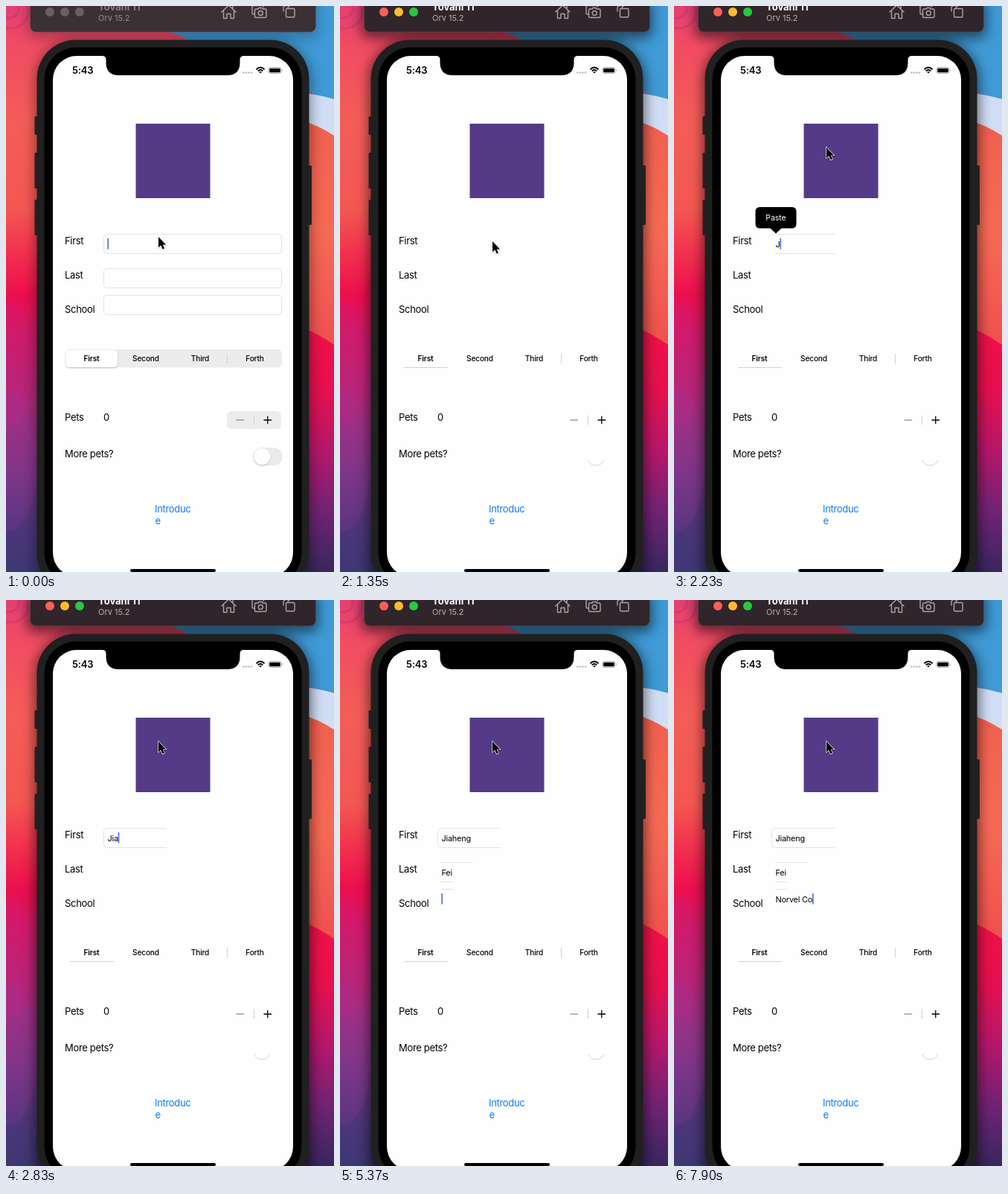
Write an HTML page that moves like this. It is 441 px wide and 760 px high and loops after 8000 ms.

```html
<!DOCTYPE html>
<html lang="en">
<head>
<meta charset="utf-8">
<title>Form demo</title>
<style>
html, body { margin: 0; width: 100%; height: 100%; overflow: hidden; background: #fff; }
svg { display: block; width: 441px; height: 760px; font-family: Inter, "Liberation Sans", sans-serif; }
text { white-space: pre; }
.label { font-size: 13px; letter-spacing: -.32px; }
.input { font-size: 10.9px; letter-spacing: -.2px; }
.seg { font-size: 10.1px; font-weight: 500; letter-spacing: -.15px; text-anchor: middle; }
.line { fill: none; stroke: #e3e3e3; }
.icon { fill: none; stroke: #ada3a5; stroke-width: 1.4; stroke-linejoin: round; stroke-linecap: round; }
</style>
</head>
<body>
<svg viewBox="0 0 441 760" xmlns="http://www.w3.org/2000/svg">
  <defs>
    <linearGradient id="left" x2="0" y2="1">
      <stop offset="0" stop-color="#e24070"/>
      <stop offset=".07" stop-color="#f04c62"/>
      <stop offset=".2" stop-color="#f35d58"/>
      <stop offset=".36" stop-color="#f35752"/>
      <stop offset=".44" stop-color="#f22f4e"/>
      <stop offset=".51" stop-color="#ec0f4e"/>
      <stop offset=".58" stop-color="#cf1c66"/>
      <stop offset=".7" stop-color="#a92c7c"/>
      <stop offset=".82" stop-color="#793683"/>
      <stop offset=".92" stop-color="#4c3679"/>
      <stop offset="1" stop-color="#3d3873"/>
    </linearGradient>
    <linearGradient id="coral" gradientUnits="userSpaceOnUse" x1="0" y1="160" x2="0" y2="445">
      <stop offset="0" stop-color="#f2604f"/>
      <stop offset=".5" stop-color="#f56a55"/>
      <stop offset="1" stop-color="#f0524f"/>
    </linearGradient>
    <linearGradient id="crimson" gradientUnits="userSpaceOnUse" x1="0" y1="435" x2="0" y2="760">
      <stop offset="0" stop-color="#f01048"/>
      <stop offset=".25" stop-color="#e5104f"/>
      <stop offset=".5" stop-color="#b5176a"/>
      <stop offset=".75" stop-color="#702374"/>
      <stop offset="1" stop-color="#38275f"/>
    </linearGradient>
    <filter id="soft" x="-30%" y="-30%" width="160%" height="160%"><feGaussianBlur stdDeviation="8"/></filter>
    <filter id="drop" x="-30%" y="-30%" width="160%" height="160%"><feDropShadow dx="0" dy="1" stdDeviation="1" flood-opacity=".25"/></filter>
  </defs>

  <g id="wallpaper">
    <rect width="441" height="760" fill="url(#left)"/>
    <g fill="none" stroke="#b8217d" stroke-opacity=".3" stroke-width="3">
      <ellipse cx="6" cy="8" rx="24" ry="22"/>
      <ellipse cx="4" cy="4" rx="13" ry="12"/>
    </g>
    <ellipse cx="6" cy="480" rx="32" ry="82" fill="#c91b7c" opacity=".25"/>
    <ellipse cx="4" cy="610" rx="38" ry="95" fill="#9c379a" opacity=".2"/>
    <path d="M205 30Q228 36 250 48L441 130V0H205Z" fill="#3f9ad6"/>
    <path d="M395 116Q420 119 441 125V176L395 156Z" fill="#d0def5"/>
    <path d="M395 153Q420 160 441 174V460H395Z" fill="url(#coral)"/>
    <path d="M395 430Q420 440 441 455V760H395Z" fill="url(#crimson)"/>
  </g>

  <g filter="url(#soft)">
    <rect id="barShadow" x="28" y="-10" width="392" height="54" rx="12"/>
    <rect id="phoneShadow" x="38" y="46" width="373" height="760" rx="54"/>
  </g>

  <g id="toolbar">
    <rect id="bar" x="32.5" y="-12" width="384" height="47" rx="8" stroke="#6a5558" stroke-opacity=".5"/>
    <g id="lights"></g>
    <text id="device" x="124" y="6" font-size="13" font-weight="700">Tovani 11</text>
    <text id="system" x="124" y="20" font-size="11">Orv 15.2</text>
    <g class="icon">
      <path d="M290 8L299.5-1L309 8M292.5 7V16.5H297V10.5H302V16.5H306.5V7M305 0V3"/>
      <path d="M334 11H332.5Q331 11 331 9.500V1Q331-.5 332.500-.5H345Q346.500-.5 346.500 1M336 4H339L340 2.500H344L345 4H348.500Q350 4 350 5.500V14Q350 15.500 348.500 15.500H336Q334.500 15.500 334.500 14V5.500Q334.500 4 336 4Z"/>
      <circle cx="342.300" cy="9.500" r="3"/>
      <path d="M378 3.500H386.500Q388 3.500 388 5V13.500Q388 15 386.500 15H378Q376.500 15 376.500 13.500V5Q376.500 3.500 378 3.500ZM373 7V3Q373-.5 376.500-.5H381M379-3L381.500-.5L379 2"/>
    </g>
  </g>

  <g id="phone">
    <g fill="#232022">
      <rect x="38.500" y="148" width="5" height="25" rx="1.500"/>
      <rect x="38.500" y="197" width="5" height="48" rx="1.500"/>
      <rect x="38.500" y="260" width="5" height="48" rx="1.500"/>
      <rect x="406" y="214" width="5" height="80" rx="1.500"/>
    </g>
    <rect x="41.500" y="45.500" width="366" height="742" rx="52" fill="#202021"/>
    <rect x="51.500" y="55.500" width="346" height="722" rx="43"/>
    <rect x="63" y="67" width="323" height="699" rx="32" fill="#fefefe"/>
    <path d="M129 66H320V67Q314.500 67 314.500 72V76Q314.500 93 297.500 93H151.500Q134.500 93 134.500 76V72Q134.500 67 129 67Z"/>
    <rect x="167" y="756" width="115" height="4" rx="2"/>
    <text x="89" y="91" font-size="13" font-weight="600" letter-spacing="-.2">5:43</text>
    <g fill="#b9b9b9">
      <circle cx="319.500" cy="89.500" r="1.200"/><circle cx="323" cy="89.500" r="1.200"/>
      <circle cx="326.500" cy="89.500" r="1.200"/><circle cx="330" cy="89.500" r="1.200"/>
    </g>
    <g fill="none" stroke="#000" stroke-width="1.900">
      <path d="M336.500 85.200Q342 80 347.500 85.200M338.700 87.400Q342 84.300 345.300 87.400"/>
    </g>
    <path d="M340.200 88.700Q342 87.200 343.800 88.700L342 90.600Z"/>
    <rect x="353" y="82.500" width="17" height="8" rx="2.300" fill="#fff" stroke="#999" stroke-width=".8"/>
    <rect x="354.200" y="83.700" width="14.600" height="5.600" rx="1.300"/>
    <path d="M371.300 85Q373 86.500 371.300 88Z" fill="#888"/>
    <rect x="174.500" y="158" width="100" height="100" fill="#553b87"/>
  </g>

  <g id="full">
    <g class="line">
      <rect x="131.500" y="306.500" width="239" height="26" rx="4"/>
      <rect x="131.500" y="352.500" width="239" height="26" rx="4"/>
      <rect x="131.500" y="388.500" width="239" height="26" rx="4"/>
    </g>
    <rect x="80" y="461" width="291" height="24.500" rx="6" fill="#ececec"/>
    <rect x="80.500" y="462" width="69.500" height="23" rx="5.500" fill="#fff" filter="url(#drop)"/>
    <rect x="297" y="544" width="73" height="24" rx="6" fill="#ececec"/>
    <rect x="332" y="593" width="40" height="24" rx="12" fill="#ebebeb"/>
    <circle cx="344.200" cy="605" r="11" fill="#fff" filter="url(#drop)"/>
  </g>
  <g id="bare" fill="none" stroke="#d2d2d2">
    <path d="M86 485.500H145"/>
    <path d="M333.500 609.500A11.500 11.500 0 0 0 355 609.500"/>
  </g>
  <g class="line">
    <path id="edge1" d="M136 306.500H216M136 332.500H216"/>
    <path id="side1" d="M137 306.500H135.500Q131.500 306.500 131.500 310.500V328.500Q131.500 332.500 135.500 332.500H137"/>
    <path id="edge2" d="M136 352.500H179"/>
    <path id="edge3" d="M136 378.500H152M136 388.500H152"/>
  </g>

  <g id="form">
    <g class="label">
      <text x="79" y="319.500">First</text>
      <text x="79" y="365.500">Last</text>
      <text x="79" y="411.500">School</text>
      <text x="79" y="556.500">Pets</text>
      <text x="131" y="556.500">0</text>
      <text x="79" y="605.500">More pets?</text>
      <g fill="#0a7aff"><text x="200" y="680">Introduc</text><text x="200.500" y="695.500">e</text></g>
    </g>
    <g class="seg">
      <text x="115" y="477" font-weight="600">First</text>
      <text x="188" y="477">Second</text>
      <text x="261" y="477">Third</text>
      <text x="334.500" y="477">Forth</text>
    </g>
    <path d="M297.500 467V480M333.500 549.500V562.500" stroke="#d0d0d0"/>
    <path d="M309.500 556H320" stroke="#8e8e8e" stroke-width="1.300"/>
    <path d="M346.500 556H357M351.750 550.750V561.250" stroke="#000" stroke-width="1.300"/>
  </g>

  <g class="input">
    <text id="in0" x="136.500" y="324"/>
    <text id="in1" x="136.500" y="370"/>
    <text id="in2" x="136.500" y="406"/>
  </g>
  <rect id="caret" width="1.500" height="14.500" fill="#4460d8"/>

  <g id="popup">
    <path d="M115.500 270H158.500Q164.500 270 164.500 276V292.500Q164.500 298.500 158.500 298.500H144.500L137 305.500L129.500 298.500H115.500Q109.500 298.500 109.500 292.500V276Q109.500 270 115.500 270Z"/>
    <text x="137" y="288.300" font-size="10.600" fill="#fff" text-anchor="middle" letter-spacing="-.1">Paste</text>
  </g>
  <path id="pointer" d="M0 0V14.200L3.200 11.200L5.600 16.600L8 15.600L5.700 10.400H10Z" stroke="#fff" stroke-width="1.200" paint-order="stroke" filter="url(#drop)"/>
</svg>
<script>
const LOOP = 8000;
const el = id => document.getElementById(id);
const values = ['Jiaheng', 'Fei', 'Norvel Co'];
const caretTops = [312, 358, 394];

// When each character of a field lands
const typed = [
  [2230, 2530, 2830, 3130, 3280, 3420, 3720],
  [4470, 4770, 5070],
  [5970, 6110, 6410, 6560, 6860, 7010, 7150, 7600, 7900]
];

// Stepped values: [start, value]
const pointerY = [[0, 310], [300, 311], [450, 313], [600, 315], [750, 316], [1500, 190]];
const caretAlpha = [[0, 1], [450, .5], [600, 0], [900, .7], [1350, 0], [1800, 1], [5820, .6], [5970, 1]];
const popupAlpha = [[0, 0], [1800, .35], [1950, .8], [2090, 1], [2530, 0]];

const lights = ['#ff5f57', '#febc2e', '#28c840'].map((color, i) => {
  const dot = document.createElementNS('http://www.w3.org/2000/svg', 'circle');
  dot.setAttribute('cx', 59 + 20 * i);
  dot.setAttribute('cy', 8);
  dot.setAttribute('r', 6);
  el('lights').append(dot);
  return { dot, color };
});

const pen = document.createElement('canvas').getContext('2d');
function widthOf(text) {
  pen.font = '10.9px Inter, "Liberation Sans", sans-serif';
  return pen.measureText(text).width - .2 * text.length;
}

const at = (steps, t) => steps.filter(([start]) => t >= start).pop()[1];
const show = (id, on) => el(id).setAttribute('display', on ? 'inline' : 'none');
const set = (id, name, value) => el(id).setAttribute(name, value);

function draw(t) {
  const active = t >= 1350;
  set('bar', 'fill', active ? '#30252a' : '#3b3033');
  set('device', 'fill', active ? '#fff' : '#877d7f');
  set('system', 'fill', active ? '#b9aeb1' : '#978d8f');
  set('barShadow', 'opacity', active ? .5 : .22);
  set('phoneShadow', 'opacity', active ? .5 : .35);
  for (const { dot, color } of lights) dot.setAttribute('fill', active ? color : '#6a6062');

  show('full', !active);
  show('bare', active);
  show('edge1', t >= 1500);
  show('side1', t >= 2530);
  show('edge2', t >= 4020);
  show('edge3', t >= 5370);

  const texts = values.map((value, i) => value.slice(0, typed[i].filter(start => t >= start).length));
  texts.forEach((text, i) => { el('in' + i).textContent = text; });

  const field = t < 4020 ? 0 : t < 5370 ? 1 : 2;
  set('caret', 'x', 136.4 + widthOf(texts[field]));
  set('caret', 'y', caretTops[field]);
  set('caret', 'opacity', at(caretAlpha, t));
  set('popup', 'opacity', at(popupAlpha, t));
  set('pointer', 'transform', `translate(205 ${at(pointerY, t)})`);
}

const begin = performance.now();
function tick() {
  draw((performance.now() - begin) % LOOP);
  requestAnimationFrame(tick);
}
tick();
</script>
</body>
</html>
```
